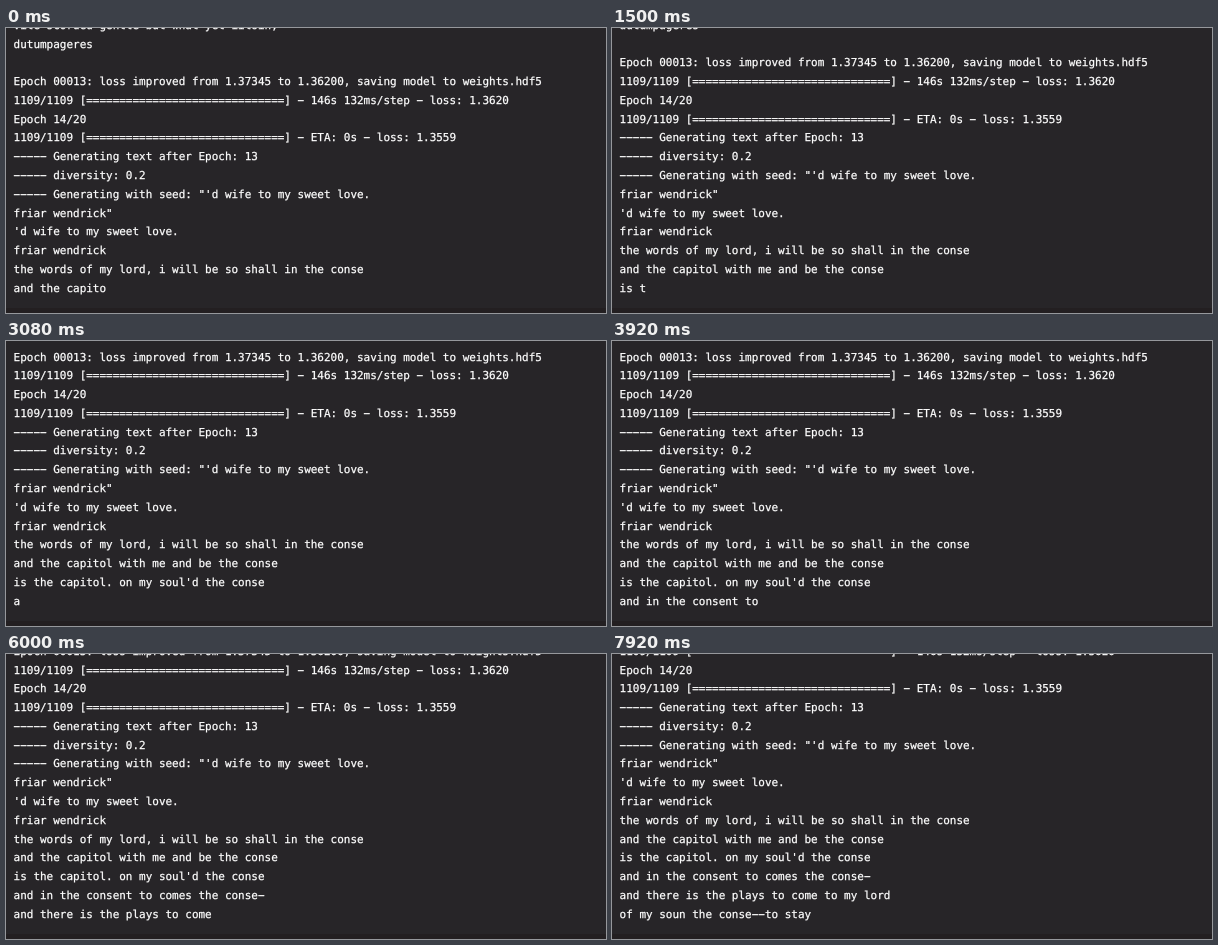
These frames come from a looping animation (600 by 285 pixels, 8000 ms). An HTML page:

```html
<!DOCTYPE html>
<html lang="en">
<head>
<meta charset="utf-8">
<title>Training log</title>
<style>
  html, body { margin: 0; width: 100%; height: 100%; overflow: hidden; background: #272528; }
  #term {
    position: absolute; left: 0; top: 0; width: 600px; height: 285px; overflow: hidden;
    background: linear-gradient(#272528 280px, #231f21 280px);
    color: #fff;
    font: 10.975px/19px "DejaVu Sans Mono", Menlo, monospace;
    -webkit-text-stroke: 0.25px #fff;
    text-rendering: geometricPrecision;
    font-variant-ligatures: none;
  }
  #term div { position: absolute; left: 7.6px; height: 19px; white-space: pre; }
</style>
</head>
<body>
<div id="term"></div>
<script>
const bar = "1109/1109 [" + "=".repeat(30) + "] - ";
const log = [
  "vile scorded gentle but what yet iiloin,",
  "dutumpageres",
  "",
  "Epoch 00013: loss improved from 1.37345 to 1.36200, saving model to weights.hdf5",
  bar + "146s 132ms/step - loss: 1.3620",
  "Epoch 14/20",
  bar + "ETA: 0s - loss: 1.3559",
  "----- Generating text after Epoch: 13",
  "----- diversity: 0.2",
  "----- Generating with seed: \"'d wife to my sweet love.",
  "friar wendrick\"",
  "'d wife to my sweet love.",
  "friar wendrick",
  "the words of my lord, i will be so shall in the conse"
];

// each line is typed evenly between two ticks
const typed = [
  { from: -8, to: 15, text: "and the capitol with me and be the conse" },
  { from: 16, to: 34.5, text: "is the capitol. on my soul'd the conse" },
  { from: 36.5, to: 55.5, text: "and in the consent to comes the conse-" },
  { from: 56.5, to: 78, text: "and there is the plays to come to my lord" },
  { from: 79, to: 95, text: "of my soun the conse--to stay" }
];
const LOOP = 8000, TICKS = 96, ROWS = 15, PITCH = 18.77, LAST_TOP = 250.6;

const term = document.getElementById("term");
const rows = Array.from({ length: ROWS }, (_, i) => {
  const row = document.createElement("div");
  row.style.top = Math.round(LAST_TOP - PITCH * (ROWS - 1 - i)) + "px";
  return term.appendChild(row);
});

function typedPart({ from, to, text }, tick) {
  const done = Math.min(1, (tick - from) / (to - from));
  return text.slice(0, Math.round(text.length * done));
}

let shown = -1;
function draw(now) {
  const tick = Math.min(TICKS - 1, Math.floor((now % LOOP + 4) * TICKS / LOOP));
  if (tick === shown) return;
  shown = tick;
  const begun = typed.filter(line => tick > line.from);
  const lines = log.concat(begun.map(line => typedPart(line, tick))).slice(-ROWS);
  // the wide minus sign gives the terminal's long dashes
  rows.forEach((row, i) => { row.textContent = lines[i].replace(/-/g, "\u2212"); });
}

const start = performance.now();
function loop() {
  draw(performance.now() - start);
  requestAnimationFrame(loop);
}
loop();
</script>
</body>
</html>
```
